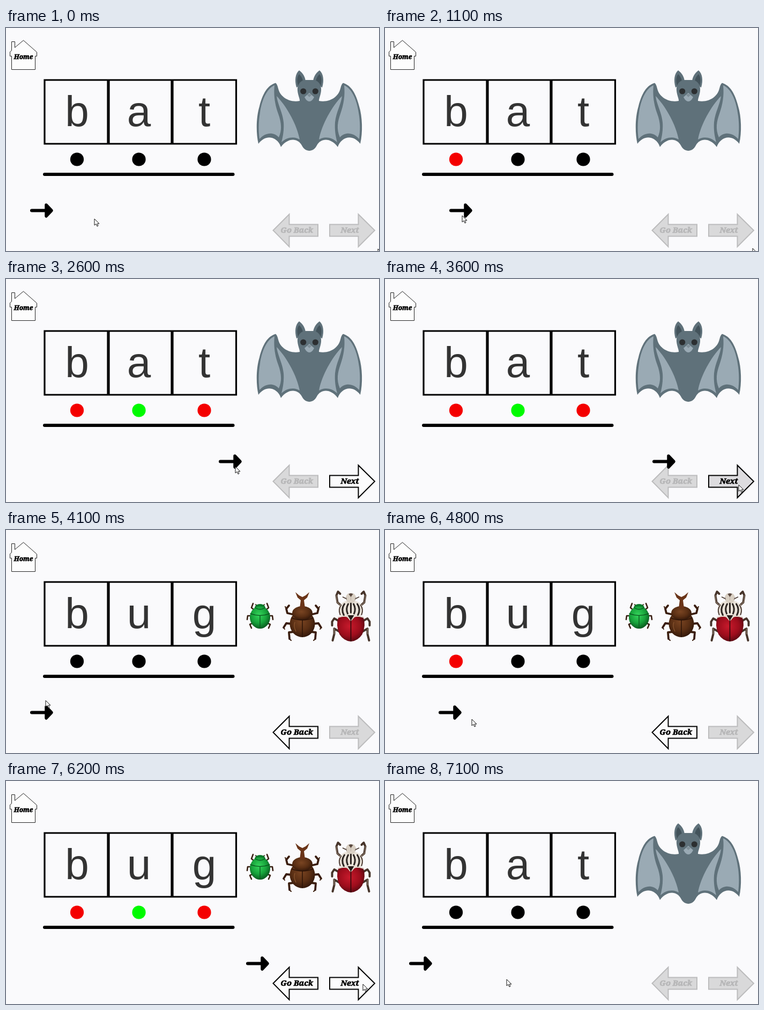
An HTML page for the animation above (7200 ms loop, 696 by 416 pixels).

```html
<!DOCTYPE html>
<html lang="en">
<head>
<meta charset="utf-8">
<title>Sound out the word</title>
<style>
  html, body { margin: 0; width: 100%; height: 100%; overflow: hidden; background: #fafafc; }
  svg { display: block; width: 696px; height: 416px; }
  .letter { font: 80px "Liberation Sans", Arial, sans-serif; fill: #333; text-anchor: middle; }
  .label { font: italic 900 14.6px "Noto Serif", serif; text-anchor: middle; stroke-width: .7; }
  .btn path { fill: #fcfcfd; stroke: #000; stroke-width: 2; }
  .btn text { fill: #000; stroke: #000; }
  .btn.down path { fill: #dddcdf; }
  .btn.off path { fill: #d9d9da; stroke: #bcbcbd; }
  .btn.off text { fill: #b9b9ba; stroke: #b3b3b4; }
  .leg { fill: none; stroke-linecap: round; stroke-linejoin: round; }
</style>
</head>
<body>
<svg viewBox="0 0 696 416">
  <defs>
    <radialGradient id="green" cx=".45" cy=".4" r=".6">
      <stop offset="0" stop-color="#35d55c"/><stop offset=".6" stop-color="#17a33b"/><stop offset="1" stop-color="#0a5c20"/>
    </radialGradient>
    <radialGradient id="brown" cx=".45" cy=".4" r=".6">
      <stop offset="0" stop-color="#7a4522"/><stop offset=".6" stop-color="#5a2f14"/><stop offset="1" stop-color="#35190a"/>
    </radialGradient>
    <radialGradient id="red" cx=".45" cy=".4" r=".65">
      <stop offset="0" stop-color="#c81a2c"/><stop offset=".6" stop-color="#9c0d1c"/><stop offset="1" stop-color="#4c0810"/>
    </radialGradient>
    <path id="pointer" d="M0 0V12L3 9.5L5 14L7 13L5 9H9Z" fill="#fff" stroke="#111" stroke-linejoin="round"/>
  </defs>

  <g id="home">
    <path d="M10.5 77.5V52.5H7.5V44.5L10.5 42V25.5H16.5V36.5L32.5 23L57.5 45V52.5H54.5V77.5Z" fill="#fdfdfd" stroke="#222"/>
    <text class="label" x="32.5" y="58" style="font-size:12px" stroke="#000">Home</text>
  </g>

  <g fill="none" stroke="#000" stroke-width="3.2">
    <path d="M72 97H190V216H72ZM192 97H309V216H192ZM311 97H429.5V216H311Z"/>
    <path d="M72 273H423.5" stroke-width="6" stroke-linecap="round"/>
  </g>
  <g id="letters"></g>
  <g id="dots"></g>
  <g id="bat"></g>
  <g id="bugs"></g>

  <g id="back" class="btn">
    <path d="M582 366.5H528.5V347.5L498.5 377.5L528.5 408V388.5H582Z"/>
    <text class="label" x="542.5" y="382">Go Back</text>
  </g>
  <g id="next" class="btn">
    <path d="M604 366.5H657.5V347.5L688 377.5L657.5 408V388.5H604Z"/>
    <text class="label" x="641.5" y="382">Next</text>
  </g>

  <g id="arrow" stroke="#000" stroke-linecap="round" stroke-linejoin="round">
    <path d="M3 340.5H30" stroke-width="6"/>
    <path d="M30 330L40 340.5L30 351Z" stroke-width="5.5"/>
  </g>
  <use id="spare" href="#pointer"/>
  <use id="cursor" href="#pointer"/>
</svg>
<script>
const LOOP = 7200, STEP = 100;
const SLOTS = [132.5, 248, 370];
const LIT = ['#f40000', '#00fa00', '#f40000'];
const $ = id => document.getElementById(id);

// Draw a left half and its mirror image around x = cx.
const pair = half => half + `<g transform="scale(-1 1)">${half}</g>`;
const at = (cx, body) => `<g transform="translate(${cx})">${body}</g>`;
const leg = (color, width, d) => `<path class="leg" stroke="${color}" stroke-width="${width}" d="${d}"/>`;
const shape = (fill, d) => `<path fill="${fill}" d="${d}"/>`;
const oval = (fill, cy, rx, ry) => `<ellipse fill="${fill}" cy="${cy}" rx="${rx}" ry="${ry}"/>`;

const BODY = '#5f717a', SKIN = '#9aaab4';
$('bat').innerHTML = at(566, pair(
  shape(BODY, 'M1 229C-8 229-12 223-14 219C-22 204-41 205-53 222C-59 204-80 196-95 216C-100 195-99 165-93 146C-87 122-78 107-63 102.5C-57 107-60 118-50 127C-41 136-28 138-18 136H1Z') +
  shape(SKIN, 'M-65 107C-80 113-89 136-92 158C-95 175-95 192-93 207C-82 195-67 193-57 204C-50 188-53 174-58 160C-64 143-67 126-65 107Z') +
  shape(SKIN, 'M-61 127C-59 143-50 157-48 176C-47 190-49 202-52 213C-43 204-28 201-18 208C-23 180-43 145-61 127Z') +
  shape(BODY, 'M-24 111C-28 97-26 85-19 79C-12 84-7 92-7 101Z') +
  shape('#43535b', 'M-21 108C-24 98-23 91-19 86C-14 91-12 96-12 102Z') +
  shape(BODY, 'M1 97H-9C-18 99-23 107-22 117C-21 127-17 132-18 139H1Z') +
  '<circle cx="-11.3" cy="118" r="5.6" fill="#2c2f31"/>') +
  shape(SKIN, 'M0 121L9 129Q5 137 0 137Q-5 137-9 129Z') +
  shape('#7f8e97', 'M-4 125Q0 121 4 125L0 129Z'));

const greenBug = pair(
    leg('#3b2115', 2.6, 'M-11 149L-16 145L-13 137M-17 160L-23 160L-24 167M-14 174L-19 176L-16 183') +
    leg('#3b2115', 2, 'M-5 143L-8 139')) +
  oval('#0b7a2a', 145, 10, 7) + oval('url(#green)', 163, 19, 21) +
  leg('#0a5a20', 1.4, 'M-18 156Q0 163 18 156M0 160V183M-9 145Q0 151 9 145');

const brownBug = pair(
    leg('#3a1d0d', 3.8, 'M-15 158L-28 155L-30 147L-25 141M-20 175L-30 174L-35 182M-17 190L-25 191L-24 203') +
    leg('#3a1d0d', 2, 'M-30 147L-32 143M-35 182L-33 185M-24 203L-21 206')) +
  oval('url(#brown)', 175, 23.5, 25) + oval('url(#brown)', 155, 19, 13) +
  shape('#6a3418', 'M-5 146L-3 131L-9 126L-13 116L-6 122L0 125L6 122L13 116L9 126L3 131L5 146Z') +
  leg('#2b1307', 1.5, 'M-20 164Q0 172 20 164M0 168V199') +
  leg('#8a5630', 1.2, 'M-14 172Q-17 180-12 189');

const redBug = pair(
    leg('#46342a', 4, 'M-16 143L-25 135L-27 122L-24 115L-20 119M-22 170L-31 165L-35 171L-35 178M-19 191L-31 184L-31 194L-34 206') +
    leg('#8d7b6c', 1.3, 'M-18 142L-26 134L-27 122M-31 184L-31 194')) +
  oval('#5b4a40', 127, 9, 9) + oval('#e9e2d8', 149, 23, 18) +
  pair(shape('#d9d0c4', 'M0 125L-5 118L-9 123L-7 134L0 138Z') +
    leg('#2b2421', 3, 'M-5 138Q-10 147-6 156M-12 138Q-19 148-13 159') +
    leg('#4a3a32', 2, 'M-18 140Q-24 148-20 158') +
    leg('#4a3a32', 1.6, 'M-9 128L-15 125')) +
  leg('#2b2421', 3, 'M0 137V154') +
  shape('url(#red)', 'M-23 162Q-13 159-6 162L0 168L6 162Q13 159 23 162Q29 178 21 195Q13 207 0 208Q-13 207-21 195Q-29 178-23 162Z') +
  leg('#e6dcd0', 2, 'M-24 163Q-12 159-6 162L0 169L6 162Q12 159 24 163') +
  shape('#241a18', 'M-6 159H6L0 169Z') +
  leg('#2a0709', 1.6, 'M0 168V207');

$('bugs').innerHTML = at(474, greenBug) + at(553, brownBug) + at(643.5, redBug);

$('letters').innerHTML = SLOTS.map(x => `<text class="letter" x="${x}" y="183"></text>`).join('');
$('dots').innerHTML = SLOTS.map(x => `<circle cx="${x}" cy="245" r="12.6"/>`).join('');
const letters = [...$('letters').children], dots = [...$('dots').children];

// Rows are [time, value, ...]; values are linear between rows.
const ARROW = [[0, 45], [700, 45], [1900, 270], [2400, 356], [3100, 499], [3699, 499],
  [3700, 45], [4500, 45], [4800, 100], [5400, 290], [5900, 448], [6499, 448], [6500, 45], [LOOP, 45]];
const CURSOR = [[0, 165, 356], [500, 75, 345], [700, 69, 350], [1900, 294, 350], [3100, 523, 350],
  [3600, 660, 384], [3700, 660, 384], [4100, 74, 318], [4300, 80, 346], [4500, 80, 352],
  [5400, 325, 354], [5900, 483, 354], [6200, 666, 379], [6500, 666, 379], [7100, 227, 370], [LOOP, 227, 370]];
const SPARE = [[0, 694, 412], [1900, 681, 411], [2300, 678, 416], [LOOP, 678, 430]];

function sample(rows, t) {
  const i = rows.findIndex(r => r[0] > t);
  const a = rows[i - 1], b = rows[i], k = (t - a[0]) / (b[0] - a[0]);
  return a.slice(1).map((v, j) => v + (b[j + 1] - v) * k);
}
const place = (id, x, y) => $(id).setAttribute('transform', `translate(${Math.round(x)} ${Math.round(y)})`);

function draw(t) {
  const bug = t >= 3700 && t < 6500;
  const [x] = sample(ARROW, t);
  const reached = SLOTS.map(cx => x + 43 >= cx);
  const pressed = t === 3600 || t === 6400;

  letters.forEach((el, i) => { el.textContent = (bug ? 'bug' : 'bat')[i]; });
  dots.forEach((el, i) => el.setAttribute('fill', reached[i] ? LIT[i] : '#000'));
  $('bat').style.display = bug ? 'none' : '';
  $('bugs').style.display = bug ? '' : 'none';
  $('back').setAttribute('class', bug ? 'btn' : 'btn off');
  $('next').setAttribute('class', !reached[2] ? 'btn off' : pressed ? 'btn down' : 'btn');
  place('arrow', x, 0);
  place('cursor', ...sample(CURSOR, t));
  place('spare', ...sample(SPARE, t));
  $('spare').style.display = t < 2400 ? '' : 'none';
}

function tick() {
  draw(Math.floor(performance.now() % LOOP / STEP) * STEP);
  requestAnimationFrame(tick);
}
tick();
</script>
</body>
</html>
```
